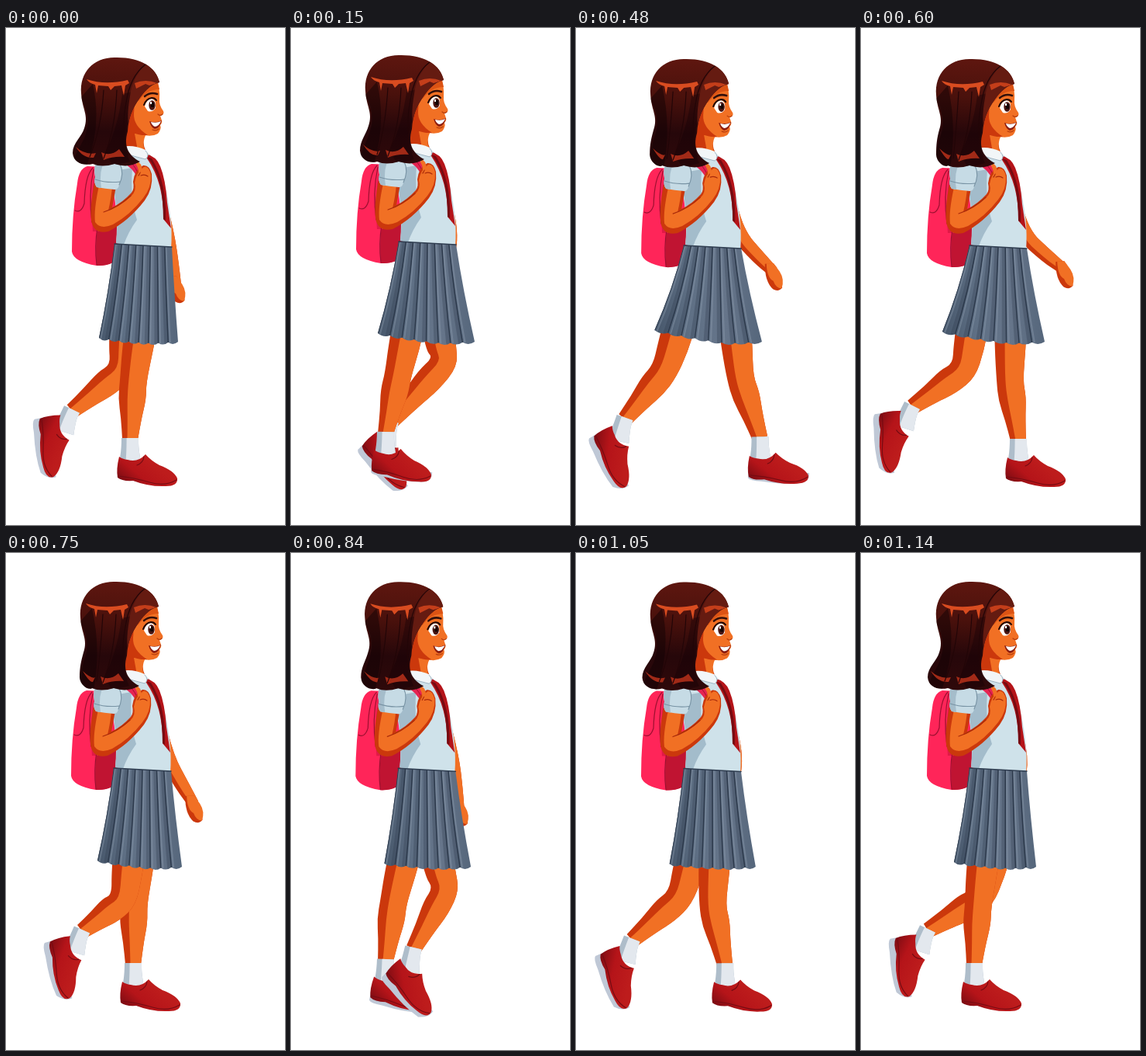
An HTML page with a canvas that plays this animation: 360 px wide and 640 px high, repeating every 1170 ms.

```html
<!DOCTYPE html>
<html lang="en">
<head>
<meta charset="utf-8">
<title>Walking schoolgirl</title>
<style>
  html, body { margin: 0; width: 100%; height: 100%; overflow: hidden; background: #fff; }
  canvas { display: block; }
</style>
</head>
<body>
<canvas id="stage" width="360" height="640"></canvas>
<script>
const ctx = document.getElementById('stage').getContext('2d');
const LOOP = 1170, STEP = 30;
const SKIN = '#f17024', SKIN_SHADE = '#cb380c', RED = '#b51419', DARK_RED = '#760b12';

// time, thigh x, knee x, knee y, ankle x, ankle y, foot angle
const nearLeg = [
  [0, 176, 164, 455, 160, 530, 0],
  [150, 153, 138, 447, 122, 522, 3],
  [330, 130, 104, 446, 80, 518, 20],
  [460, 134, 112, 442, 64, 506, 52],
  [600, 145, 133, 441, 66, 488, 78],
  [750, 160, 152, 447, 98, 487, 70],
  [840, 185, 200, 433, 158, 510, 40],
  [930, 205, 215, 450, 246, 522, -8],
  [1040, 182, 179, 454, 197, 530, 0],
  [1140, 160, 151, 455, 146, 530, 0]
];
const farLeg = [
  [0, 155, 150, 441, 85, 493, 76],
  [150, 188, 199, 430, 128, 508, 42],
  [330, 208, 215, 447, 235, 521, -3],
  [420, 208, 222, 448, 253, 522, -10],
  [500, 202, 208, 452, 231, 530, 0],
  [600, 193, 192, 455, 203, 531, 0],
  [750, 173, 165, 452, 164, 530, 0],
  [840, 150, 132, 450, 122, 525, 6],
  [930, 129, 101, 449, 86, 518, 20],
  [1040, 151, 132, 444, 72, 500, 60],
  [1140, 176, 156, 444, 86, 486, 76]
];
// time, body x, body y, hair swing, hem left x, hem left y, hem right x, hand x, hand y
const torso = [
  [0, 0, 0, 0, 120, 399, 222, 219, 338],
  [150, -1, -3, 4, 112, 393, 237, 195, 338],
  [330, -2, 1, 8, 101, 388, 241, 235, 329],
  [600, 0, 2, 11, 105, 391, 237, 262, 319],
  [750, -1, -1, 10, 118, 396, 227, 242, 331],
  [930, -2, 0, 2, 121, 402, 237, 195, 338],
  [1140, 0, -1, 0, 120, 398, 226, 197, 338]
];

const lerp = (a, b, u) => a + (b - a) * u;

// Cubic Hermite interpolation through the keys
function sample(keys, t) {
  let i = 0;
  while (i < keys.length - 2 && t >= keys[i + 1][0]) i++;
  const a = keys[i], b = keys[i + 1], span = b[0] - a[0], u = (t - a[0]) / span;
  const slope = (k, c) => {
    const p = keys[Math.max(k - 1, 0)], n = keys[Math.min(k + 1, keys.length - 1)];
    return (n[c] - p[c]) / (n[0] - p[0]) * span;
  };
  return a.map((v, c) => {
    const d = b[c] - v, m = slope(i, c), n = slope(i + 1, c);
    return v + u * (m + u * (3 * d - 2 * m - n + u * (m + n - 2 * d)));
  }).slice(1);
}

function fill(color, d) {
  ctx.fillStyle = color;
  ctx.fill(new Path2D(d));
}
function line(color, width, d) {
  ctx.strokeStyle = color;
  ctx.lineWidth = width;
  ctx.stroke(new Path2D(d));
}
function gradient(x0, y0, x1, y1, ...colors) {
  const g = ctx.createLinearGradient(x0, y0, x1, y1);
  colors.forEach((c, i) => g.addColorStop(i / (colors.length - 1), c));
  return g;
}

// Smooth limb around a spine of [x, y, half width]; back scales the rear side
function limb(color, spine, back = 1) {
  const side = sign => spine.map(([x, y, w], i) => {
    const p = spine[Math.max(i - 1, 0)], n = spine[Math.min(i + 1, spine.length - 1)];
    const dx = n[0] - p[0], dy = n[1] - p[1], k = sign * w / Math.hypot(dx, dy);
    return [x - dy * k, y + dx * k];
  });
  ctx.beginPath();
  for (const pts of [side(back), side(-1).reverse()]) {
    ctx.lineTo(...pts[0]);
    for (let i = 1; i < pts.length - 1; i++) {
      const [x, y] = pts[i], [nx, ny] = pts[i + 1];
      ctx.quadraticCurveTo(x, y, (x + nx) / 2, (y + ny) / 2);
    }
    ctx.lineTo(...pts[pts.length - 1]);
  }
  ctx.fillStyle = color;
  ctx.fill();
}

function leg([hx, kx, ky, ax, ay, deg]) {
  const on = (u, w) => [lerp(kx, ax, u), lerp(ky, ay, u), w];
  const spine = [[hx, 375, 21], [lerp(hx, kx, .5), 412, 20], [kx, ky, 17],
    on(.3, 18), on(.65, 13), on(1, 10)];
  limb(SKIN_SHADE, spine);
  limb(SKIN, spine, .35);

  const bend = deg * .4 * Math.PI / 180;
  const ox = ax - Math.sin(bend) * 22, oy = ay + Math.cos(bend) * 22;
  limb('#aebdca', [[ax, ay - 2, 11], [(ax + ox) / 2, (ay + oy) / 2, 11], [ox, oy + 8, 14]]);
  limb('#e3e8ee', [[ax, ay - 2, 11], [(ax + ox) / 2, (ay + oy) / 2, 11], [ox, oy + 8, 14]], .4);

  ctx.save();
  ctx.translate(ox, oy);
  ctx.rotate(deg * Math.PI / 180);
  const sole = Math.min(7, Math.abs(deg) * .6);
  if (sole > .5)
    fill('#bfc8d6', `M-16,20 L-17,${27 + sole} Q-15,${31 + sole} 0,${32 + sole} Q30,${38 + sole} 52,${36 + sole} Q63,35 62,25Z`);
  fill(gradient(-10, 36, 20, 0, DARK_RED, RED, '#bd1c1c'),
    'M-14,0 Q-18,16 -16,27 Q-10,32 4,31 Q25,39 46,38 Q62,38 61,28 Q57,18 38,11 Q27,5 20,-3 Q10,8 -3,4 Q-10,3 -14,0Z');
  line(DARK_RED, 1.2, 'M18,0 Q17,8 9,11 M-15,25 Q5,27 25,33 T60,30');
  ctx.restore();
}

function farArm(x, y) {
  const spine = [[192, 205, 10], [207, 264, 10], [lerp(207, x, .6), lerp(264, y, .55), 9], [x, y - 8, 7]];
  limb(SKIN_SHADE, spine);
  limb(SKIN, spine, .4);
  ctx.save();
  ctx.translate(x, y);
  ctx.rotate(-.25);
  fill(SKIN_SHADE, 'M-6,-20 Q-12,2 -4,14 Q2,20 8,15 Q12,2 5,-18Z');
  fill(SKIN, 'M-4,-20 Q-8,-2 -1,4 Q0,14 7,16 Q14,6 10,-6 L5,-18Z');
  ctx.restore();
}

function backpack() {
  fill('#ff2559', 'M105,178 Q94,181 92,200 Q85,240 85,288 Q87,301 117,306 Q142,306 146,292 L150,180Z');
  fill('#c01432', 'M118,256 Q115,285 117,306 Q142,307 147,290 L148,225Z');
  fill('#e01a46', 'M117,180 Q108,205 112,262 L122,262 L124,180Z');
  line('#9c1030', 1.2, 'M112,180 Q102,190 101,226 Q97,239 89,235 M118,256 Q114,282 117,305 M113,182 Q106,215 111,250');
}

function skirt(dx, dy, lx, ly, rx) {
  const hemY = u => lerp(ly, 404, Math.min(1, u * 1.5)) + Math.sin(u * Math.PI) * 2;
  const top = u => [lerp(140, 214, u) + dx, 278 + 4 * u + dy];
  const hem = u => [lerp(lx, rx, u), hemY(u)];
  const seam = u => {
    const [a, b] = top(u), [c, d] = hem(u);
    return `${lerp(a, c, .38)},${lerp(b, d, .52)} ${c},${d}`;
  };
  const pleats = 8;
  let d = `M${top(0)} Q${seam(0)}`;
  for (let i = 1; i <= pleats; i++) {
    const [x, y] = hem((i - .5) / pleats);
    d += ` Q${x},${y + 5} ${hem(i / pleats)}`;
  }
  const [tx, ty] = top(1), [bx, by] = hem(1);
  d += ` Q${lerp(tx, bx, .38)},${lerp(ty, by, .48)} ${tx},${ty}Z`;
  fill(gradient(lx, 0, rx, 0, '#46566a', '#5f7085', '#66758a', '#55667b'), d);
  ctx.save();
  ctx.clip(new Path2D(d));
  for (let i = 0; i < pleats; i++) {
    const u = i / pleats;
    line('rgba(40,52,70,.28)', 5, `M${top(u - .025)} Q${seam(u - .025)}`);
    line('#2c394b', 1.5, `M${top(u)} Q${seam(u)}`);
    line('rgba(142,157,176,.4)', 2, `M${top(u + .025)} Q${seam(u + .025)}`);
  }
  ctx.restore();
  line('#2f3d50', 1.5, `M${top(0)} L${top(1)}`);
}

function shirt() {
  fill(SKIN_SHADE, 'M150,128 L180,132 Q174,146 181,160 L165,172 L146,165Z');
  fill(SKIN, 'M166,136 L181,136 Q175,148 179,158 L170,158Z');
  fill('#cfe2ea', 'M150,158 Q128,164 134,190 Q146,235 142,277 Q172,284 213,284 Q216,245 204,198 Q197,172 182,160Z');
  fill('#a3bccb', 'M134,185 Q147,235 142,277 L152,279 Q158,262 169,247 Q160,220 163,180Z');
  fill(RED, 'M180,162 Q194,165 199,178 Q206,195 208,225 L213,258 L203,246 Q204,200 182,168Z');
  fill(DARK_RED, 'M182,166 Q203,190 203,246 L206,248 Q208,200 188,168Z');
  fill('#f2f6f8', 'M150,153 Q164,150 180,157 Q187,162 180,169 Q166,166 150,160Z');
  line('#9fb4c2', 1, 'M150,160 Q166,166 180,169 Q186,164 180,158');
  fill('#e62452', 'M149,160 Q164,168 174,182 L170,194 Q164,180 149,172Z');
  line('#a30f32', 1, 'M150,164 Q164,172 171,188');
}

function nearArm() {
  fill(SKIN_SHADE, 'M114,200 Q108,230 110,248 Q113,266 132,262 Q158,249 179,222 Q190,207 188,188 Q185,176 177,177 Q166,182 164,198 Q166,207 162,212 Q150,225 137,231 L142,204Z');
  fill(SKIN, 'M120,203 Q113,235 115,250 Q122,260 138,253 Q160,241 177,219 Q188,205 187,189 Q184,177 178,179 Q168,186 166,199 Q169,210 161,217 Q148,229 132,235 Q136,218 137,204Z');
  line('#a92a0a', 1.2, 'M171,175 Q176,184 171,190 M174,190 Q179,188 183,191 M126,237 Q145,231 161,216');
  fill(SKIN, 'M169,172 Q175,173 176,184 L171,187 Q171,180 168,176Z');
  fill('#c6dbe5', 'M119,168 Q132,160 145,170 Q153,185 147,199 Q145,209 140,208 Q128,207 117,205 Q113,200 115,192 Q112,178 119,168Z');
  fill('#a5bdcb', 'M119,168 Q112,178 115,192 Q113,200 117,205 L123,206 Q119,185 129,166Z');
  line('#7893a4', 1.1, 'M115,195 Q130,200 147,198 M147,175 Q153,187 146,202');
}

function head(swing) {
  fill(SKIN, 'M160,70 L194,68 Q199,78 198,91 Q197,99 203,107 Q205,111 199,113 L201,119 Q202,122 199,125 Q201,130 196,136 Q188,141 174,137 Q160,132 156,112Z');
  fill(SKIN_SHADE, 'M160,88 Q167,90 165,110 Q164,126 183,138 Q162,139 154,126Z');
  fill('#dc5314', 'M168,88 Q180,72 196,70 L198,79 Q182,79 171,94Z');
  fill('#fff', 'M179,101 Q181,92 188,91 Q194,92 193,103 Q189,109 183,107Z');
  ctx.fillStyle = '#4a1511';
  ctx.beginPath();
  ctx.ellipse(188.5, 99.5, 4.2, 6.3, 0, 0, 7);
  ctx.fill();
  fill('#140504', 'M187,96 h4 v6 h-4Z');
  fill('#fff', 'M186,95 h2 v3 h-2Z');
  line('#1e0706', 2, 'M178,99 Q181,91 188,90 Q192,90 194,93');
  line('#34100b', 2.6, 'M179,88 Q186,82 195,85');
  line('#b73d0d', 1.2, 'M196,111 Q199,114 202,111 M189,131 Q194,133 197,130');
  fill('#8c1d10', 'M185,120 Q193,123 201,119 Q198,130 192,130 Q187,128 185,120Z');
  fill('#fff', 'M187,121 Q194,123 200,120 Q197,127 192,127 Q188,125 187,121Z');

  const x = 86 + swing;
  const outline = `M140,38 C112,38 95,58 97,84 C98,104 107,112 101,129 C98,140 ${x},148 ${x},161 C${x + 1},173 ${x + 13},178 112,175
    Q124,180 140,175 Q158,181 173,172 C159,165 151,153 157,133 C158,115 163,104 172,91 C181,78 189,72 198,70 C194,50 172,37 140,38Z`;
  fill(gradient(130, 40, 125, 180, '#5d160f', '#4a110c', '#26070a', '#30090a'), outline);
  ctx.save();
  ctx.clip(new Path2D(outline));
  fill('rgba(18,2,5,.5)', `M96,90 Q112,115 101,142 L${x - 4},178 L${x + 18},178 Q124,125 112,72Z`);
  fill('rgba(20,2,5,.4)', 'M150,85 Q144,130 128,160 L138,178 L160,172 Q148,150 158,118 Q162,95 172,80Z');
  fill('#651b11', 'M181,46 Q162,65 160,88 Q156,110 158,124 Q170,92 198,73 L200,58Z');
  fill('#d94c20', 'M104,66 Q128,74 157,67 L159,71 L154,74 L152,87 L149,74 L140,75 L135,80 L132,75 L119,74 L117,84 L115,73 Q107,71 104,66Z');
  fill('#c43e1a', 'M166,71 Q180,65 195,71 L185,74 L180,72 L168,78Z');
  fill('#a22a17', `M${x + 4},153 Q${x + 16},164 116,161 L113,167 Q${x + 13},168 ${x + 4},153Z`);
  fill('#a22a17', 'M123,160 Q135,166 146,156 L153,166 Q138,165 126,170Z');
  line('#220507', 1.2, `M180,47 Q160,62 155,96 Q148,132 157,164 M126,80 Q123,130 ${x + 22},166 M143,80 Q141,130 126,168`);
  ctx.restore();
}

function draw(t) {
  const [dx, dy, swing, lx, ly, rx, handX, handY] = sample(torso, t);
  ctx.clearRect(0, 0, 360, 640);
  ctx.lineCap = ctx.lineJoin = 'round';
  farArm(handX, handY);
  leg(sample(farLeg, t));
  leg(sample(nearLeg, t));
  ctx.save();
  ctx.translate(dx, dy);
  backpack();
  shirt();
  ctx.restore();
  skirt(dx, dy, lx, ly, rx);
  ctx.translate(dx, dy);
  nearArm();
  head(swing);
  ctx.setTransform(1, 0, 0, 1, 0, 0);
}

const start = performance.now();
function tick() {
  const t = (performance.now() - start) % LOOP;
  draw(Math.floor(t / STEP) * STEP);
  requestAnimationFrame(tick);
}
tick();
</script>
</body>
</html>
```
